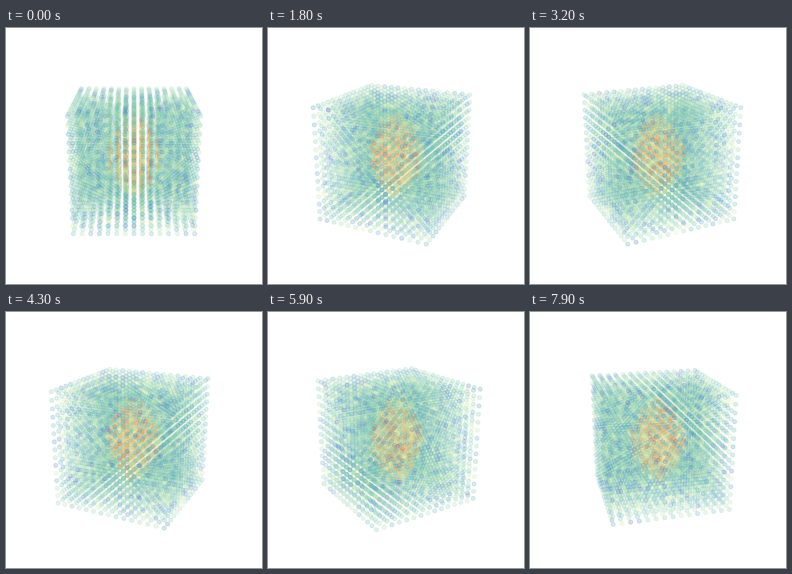
Animation, 256 px wide and 256 px high, one loop 8000 ms. Source, as a matplotlib script:

```python
import numpy as np
import matplotlib.pyplot as plt
from matplotlib.animation import FuncAnimation

SIZE = 256
DPI = 64
FRAMES = 80
STEP = 3.6            # degrees turned per frame
ELEV = np.radians(20)
DIST = 8.25           # camera distance in half cube sides
FOCAL = 464           # pixels
N = 15

rng = np.random.default_rng(4)

# Cubic lattice with a warm ellipsoid at its heart
axis = np.linspace(-1, 1, N)
x, y, z = (g.ravel() for g in np.meshgrid(axis, axis, axis))
core = (x**2 + y**2) / 0.48**2 + z**2 / 0.75**2 < 1

value = np.where(core, rng.normal(0.65, 0.065, x.size),
                 rng.normal(0.21, 0.075, x.size))
colors = plt.get_cmap("Spectral_r")(np.clip(value, 0.06, 0.9))
opacity = np.where(core, 0.34, 0.18)


def project(angle):
    """Pixel positions and nearness of all points for a turn in radians."""
    c, s = np.cos(angle), np.sin(angle)
    side, front = x * c + y * s, y * c - x * s
    near = front * np.cos(ELEV) + z * np.sin(ELEV)
    up = z * np.cos(ELEV) - front * np.sin(ELEV)
    scale = FOCAL / (DIST - near)
    return np.column_stack([side * scale, up * scale]) + SIZE / 2, near


fig = plt.figure(figsize=(SIZE / DPI, SIZE / DPI), dpi=DPI, facecolor="white")
ax = fig.add_axes([0, 0, 1, 1])
ax.set(xlim=(0, SIZE), ylim=(0, SIZE))
ax.axis("off")

px = 72 / DPI
dots = ax.scatter(x, y, s=(4 * px) ** 2, linewidths=px)


def draw(frame):
    points, near = project(np.radians(STEP * frame))
    order = np.argsort(near)
    shaded = colors.copy()
    shaded[:, 3] = opacity * (1 + 0.2 * near)
    dots.set_offsets(points[order])
    dots.set_facecolors(shaded[order])
    dots.set_edgecolors(shaded[order])
    return (dots,)


anim = FuncAnimation(fig, draw, frames=FRAMES, interval=100,
                     repeat=True, repeat_delay=0, blit=False)
plt.show()
```
